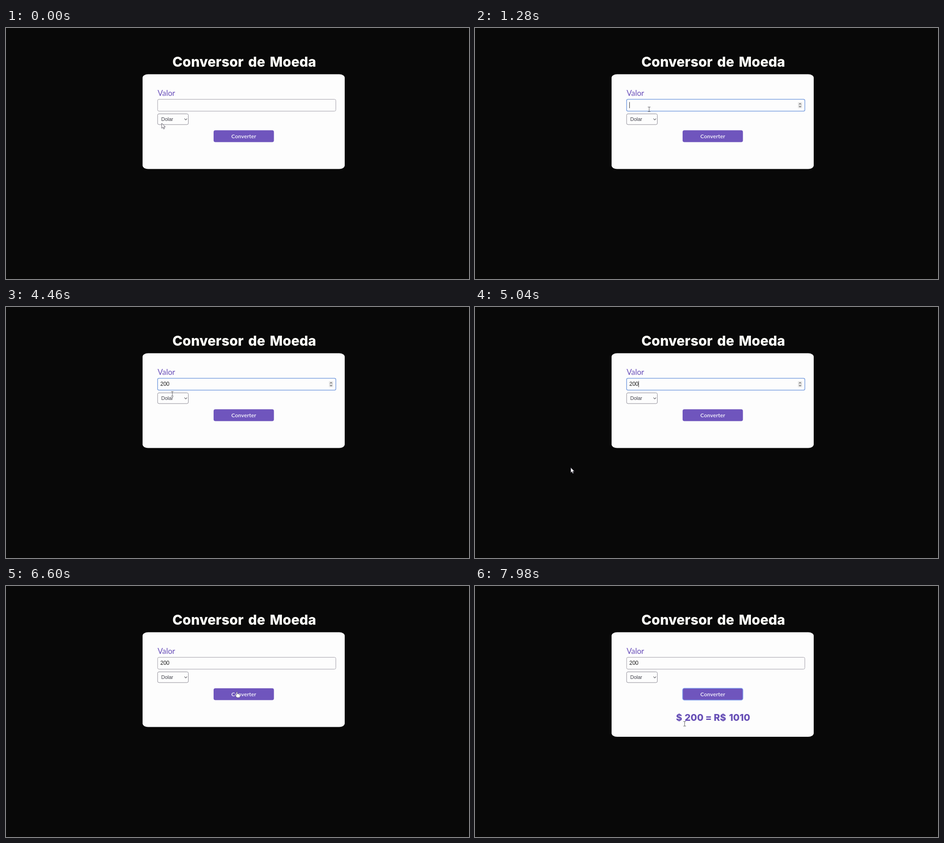
An HTML page that plays this animation: 1017x551 px, repeating every 8 s.

```html
<!DOCTYPE html>
<html lang="pt">
<head>
<meta charset="utf-8">
<title>Conversor de Moeda</title>
<style>
  html, body { margin: 0; width: 100%; height: 100%; overflow: hidden; background: #080808; }
  svg { display: block; width: 1017px; height: 551px; }
  .display { font-family: Inter, "Open Sans", sans-serif; font-weight: 800; }
  .label { font-family: Lato, "Open Sans", sans-serif; }
  .field { font-family: "Liberation Sans", Arial, sans-serif; }
  .line { fill: none; stroke-linecap: round; stroke-linejoin: round; }
</style>
</head>
<body>
<svg viewBox="0 0 1017 551" xmlns="http://www.w3.org/2000/svg">
  <rect width="1017" height="551" fill="#080808"/>
  <text class="display" y="84.8" font-size="30" fill="#fffffa">
    <tspan x="365.5">Conversor</tspan><tspan x="532">de</tspan><tspan x="579.5">Moeda</tspan>
  </text>
  <rect id="card" x="300" y="101.5" width="444" height="208" rx="12" ry="8" fill="#fdfdfd"/>
  <text class="label" x="333" y="148.5" font-size="17" fill="#6a50ba">Valor</text>

  <rect id="input" x="333" y="156.5" width="391.5" height="26" rx="3" fill="#fdfdfd"/>
  <text id="value" class="field" x="339" y="173.2" font-size="12" fill="#1c1c1c"></text>
  <path id="caret" stroke="#333"/>
  <g id="spinner">
    <rect x="709.5" y="163" width="9" height="13" fill="#e6e6e6"/>
    <path class="line" d="M712 167.5l2-2 2 2M712 171.5l2 2 2-2" stroke="#666" stroke-width="1.1"/>
  </g>

  <rect x="333" y="188.5" width="67.5" height="23.5" rx="3" fill="#fdfdfd" stroke="#8c8a94"/>
  <text class="field" x="341" y="204.2" font-size="11" fill="#40404a">Dolar</text>
  <path class="line" d="M392.3 199.2l2.6 2.6 2.6-2.6" stroke="#55555c" stroke-width="1.1"/>

  <rect id="button" x="456" y="224.5" width="132.5" height="26" rx="4" fill="#6f55bd" stroke-width="1.5"/>
  <text class="label" x="522.3" y="242.4" font-size="12" font-weight="600" letter-spacing=".15" text-anchor="middle" fill="#fbfaff">Converter</text>

  <text id="result" class="display" y="295.6" font-size="20.5" fill="#674fb6">
    <tspan x="441.5">$</tspan><tspan x="460.5">200</tspan><tspan x="506">=</tspan><tspan x="524.5">R$</tspan><tspan x="558">1010</tspan>
  </text>

  <g id="cursor">
    <path id="arrow" d="M0 0V11.2L2.6 8.8L4.3 12.8L6.2 12L4.5 8.2H8Z" fill="#fff" stroke="#35323f" stroke-width=".8"/>
    <path id="beam" class="line" transform="translate(.5 .5)" d="M-2.5 -5H2.5M0 -5V5M-2.5 5H2.5" stroke="#66666b"/>
    <path id="hand" d="M-1 1Q0 -1 1.2 1V5Q2.5 4 3.4 5.3Q4.8 4.7 5.5 6Q7.3 5.7 7.3 7.5V10L6 13H.2L-3 8.7Q-3.4 7 -1.8 7.2L-1 8Z" fill="#fff" stroke="#3a3058" stroke-width=".7"/>
  </g>
</svg>
<script>
const LOOP = 8000, BLINK = 500;
const FOCUS = 820, IDLE = 3300, BLUR = 5200, CONVERT = 7120;
const KEYS = [3660, 3760, 3940], AMOUNT = "200";

const start = { x: 342, y: 209 };
const moves = [
  { from: 20, to: 420, via: { x: 362, y: 193 }, end: { x: 382, y: 178 } },
  { from: 4320, to: 5060, via: { x: 291, y: 240 }, end: { x: 210, y: 353 } },
  { from: 5440, to: 6280, via: { x: 351, y: 317 }, end: { x: 507, y: 232 } },
  { from: 7680, to: 7980, via: { x: 484, y: 267 }, end: { x: 460, y: 302 } }
];

const el = id => document.getElementById(id);
const set = (id, attrs) => { for (const k in attrs) el(id).setAttribute(k, attrs[k]); };
const show = (id, on) => set(id, { visibility: on ? "visible" : "hidden" });
const ease = k => k * k * (3 - 2 * k);
const inside = (p, l, t, r, b) => p.x >= l && p.x <= r && p.y >= t && p.y <= b;

function pointer(t) {
  let p = start;
  for (const { from, to, via, end } of moves) {
    if (t < from) break;
    const k = ease(Math.min(1, (t - from) / (to - from)));
    const curve = c => (1 - k) ** 2 * p[c] + 2 * k * (1 - k) * via[c] + k * k * end[c];
    p = { x: curve("x"), y: curve("y") };
  }
  return p;
}

// The caret restarts its blink at each key and rests lit before the first.
function caretOn(t, count) {
  const since = count ? t - KEYS[count - 1] : Math.min(t, IDLE) - FOCUS;
  return Math.floor(since / BLINK) % 2 === 0;
}

function render(t) {
  const p = pointer(t), count = KEYS.filter(k => k <= t).length;
  const focused = t >= FOCUS && t < BLUR, done = t >= CONVERT;
  const overInput = inside(p, 333, 156, 724, 191);
  const overResult = done && inside(p, 441, 277, 603, 305);
  const kind = inside(p, 456, 224, 588, 250) ? "hand" : overInput || overResult ? "beam" : "arrow";

  set("cursor", { transform: `translate(${p.x.toFixed(1)} ${p.y.toFixed(1)})` });
  for (const k of ["arrow", "beam", "hand"]) show(k, k === kind);

  el("value").textContent = AMOUNT.slice(0, count);
  set("caret", { d: `M${339.5 + count * 6.67} 162.5V176` });
  show("caret", focused && caretOn(t, count));
  show("spinner", focused || overInput);
  set("input", { stroke: focused ? "#7a9fdf" : "#a19ea8", "stroke-width": focused ? 1.5 : 1 });

  set("card", { height: done ? 229.5 : 208 });
  set("button", { stroke: done ? "#86a4ee" : "none" });
  show("result", done);
}

function tick(now) {
  render(now % LOOP);
  requestAnimationFrame(tick);
}
render(0);
requestAnimationFrame(tick);
</script>
</body>
</html>
```
